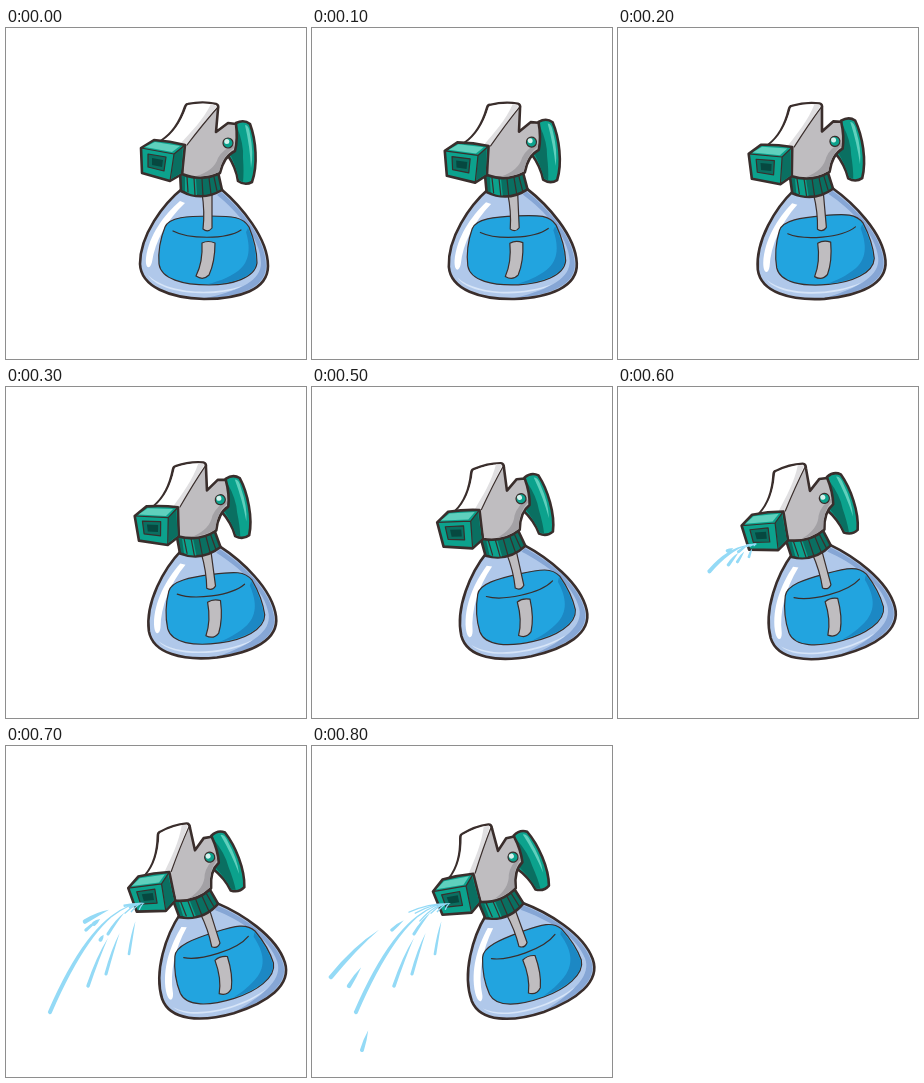
An HTML page that plays this animation: 300 px wide and 331 px high, repeating every 900 ms.

```html
<!DOCTYPE html>
<html lang="en">
<head>
<meta charset="utf-8">
<title>Spray bottle</title>
<style>
  html, body { margin: 0; width: 100%; height: 100%; overflow: hidden; background: #fff; }
  svg { display: block; width: 100vw; height: 100vh; }
  .line, .thin { stroke: #3a2e2c; stroke-linejoin: round; stroke-linecap: round; }
  .line { stroke-width: 2.6; }
  .thin { stroke-width: 1.2; }
  .none { fill: none; }
  .teal { fill: #0ca28d; }
  .dark { fill: #0a6f61; }
  .mint { fill: #5fd0bd; }
  .gray { fill: #bfbdc0; }
  .white { fill: #fff; }
  .shade { fill: #a3a1a5; }
</style>
</head>
<body>
<svg viewBox="0 0 300 331">
  <g id="bottle">
    <!-- glass -->
    <path fill="#b0c8ea" d="M177 160C157 176 134 207 134 236C135 259 164 270 198 271C233 271 262 262 262 238C262 210 235 178 215 161Z"/>
    <path fill="#86a6d5" d="M215 164C235 181 260 211 260 238C260 261 231 269 200 270C236 262 255 252 255 235C255 211 232 184 211 167Z"/>
    <path fill="#d7e5f8" d="M142 247C160 265 205 268 236 258C216 270 155 268 142 247Z"/>
    <path class="white" d="M174 173C158 187 143 207 140 230C139 241 144 242 146 234C149 213 161 192 179 175Z"/>

    <!-- water -->
    <path class="thin" fill="#22a4df" d="M159 199C163 189 182 188 204 188C227 188 237 189 243 199C248 211 251 225 251 235C249 250 226 257 203 257C177 257 155 251 153 236C152 223 155 209 159 199Z"/>
    <path fill="#1c88c4" d="M240 204C244 218 245 233 232 243C222 250 211 254 202 256C226 256 249 249 250 235C250 224 247 211 242 200Z"/>
    <path class="thin none" d="M167 203C182 211 220 212 235 202"/>

    <!-- tube -->
    <path class="thin gray" d="M196 165L206 165L206 200Q202 205 197 201Q199 184 196 165Z"/>
    <path class="thin gray" d="M196 215Q202 212 209 215Q209 234 203 247Q197 253 190 248Q197 234 196 215Z"/>
    <path class="line none" d="M177 160C157 176 134 207 134 236C135 259 164 270 198 271C233 271 262 262 262 238C262 210 235 178 215 161"/>

    <!-- trigger -->
    <path class="line teal" d="M230 95Q238 91 244 96C250 112 252 137 246 154Q239 158 232 153C231 145 227 135 221 126Z"/>
    <path class="dark" d="M231 99Q238 116 237 130Q238 144 237 154L233 152Q230 138 224 126Z"/>
    <path class="mint" d="M239 97Q243 97 244 106Q248 125 245 140Q244 119 239 97Z"/>

    <!-- collar -->
    <path class="line dark" d="M174 144L212 144L216 162Q196 174 175 163Z"/>
    <path class="teal" d="M179 149L190 151L191 167Q184 167 179 163Z"/>
    <path class="thin none" d="M181 149L182 164M188 150L189 167M196 151L197 168M203 150L205 166M208 149L211 163"/>

    <!-- head -->
    <path class="line gray" d="M182 76Q197 73 210 76Q213 77 212 81L210 104L222 95L230 96Q232 111 229 123Q218 128 214 145Q196 154 176 146L177 117L155 113Q171 103 179 79Q180 76 182 76Z"/>
    <path class="white" d="M182 77Q198 74 210 77L211 80C200 92 190 105 181 117L156 113Q172 103 181 78Z"/>
    <path fill="#e0dfe1" d="M205 76L211 78C200 92 190 105 181 117L174 116C186 103 197 92 205 76Z"/>
    <path class="thin none" d="M212 79Q197 96 181 117"/>
    <path class="shade" d="M228 120Q217 127 213 144Q202 149 190 148Q208 143 212 130Q217 121 228 117Z"/>
    <circle class="thin teal" cx="222" cy="115" r="5"/>
    <circle fill="#d5f1ec" cx="220.8" cy="113.5" r="2.5"/>

    <!-- nozzle -->
    <path class="line teal" d="M135 120L148 112Q164 113 179 117L176 146L164 153L136 145Z"/>
    <path class="mint" d="M139 119L149 114L174 118L166 124Z"/>
    <path class="dark" d="M168 126L177 118L175 145L165 151Z"/>
    <path class="thin none" d="M135 120L168 126L179 117M168 126L164 153"/>
    <path class="thin dark" d="M142 126L160 129L158 143L142 139Z"/>
    <path fill="#064840" d="M146 130L157 132L156 139L146 137Z"/>
  </g>
  <path id="spray" fill="#94daf6"/>
</svg>
<script>
const STEP = 100, STEPS = 9, TURN = 2.5;
const NOZZLE = { x: 139, y: 157 };
const bottle = document.getElementById('bottle');
const spray = document.getElementById('spray');

// Jets fly left along parabolas; tail is where the falling drop begins.
const jets = [
  { reach: 95, fall: 109, tail: 0.2, start: 5 },
  { reach: 57, fall: 83, tail: 0.65, start: 5 },
  { reach: 39, fall: 71, tail: 0.65, start: 5 },
  { reach: 16, fall: 51, tail: 0.6, start: 5 },
  { reach: 59, fall: 27, tail: 0.8, start: 5 },
  { reach: 37, fall: 31, tail: 0.55, start: 5 },
  { reach: 120, fall: 74, tail: 0.6, start: 6 },
  { reach: 102, fall: 83, tail: 0.88, start: 6 },
  { reach: 89, fall: 147, tail: 0.93, start: 6 }
];

// Tapered piece of a jet's parabola between a and b (0 = nozzle, 1 = end).
function streak({ reach, fall }, a, b, w) {
  const at = (u, rise) => [NOZZLE.x - reach * u, NOZZLE.y + fall * rise];
  const [x1, y1] = at(a, a * a), [x2, y2] = at(b, b * b);
  const [cx, cy] = at((a + b) / 2, a * b);
  const length = Math.hypot(x2 - x1, y2 - y1);
  const nx = (y1 - y2) / length * w, ny = (x2 - x1) / length * w;
  return `M${x1} ${y1}Q${cx + nx} ${cy + ny} ${x2 + nx} ${y2 + ny}` +
    `A${w} ${w} 0 0 0 ${x2 - nx} ${y2 - ny}Q${cx - nx} ${cy - ny} ${x1} ${y1}Z`;
}

function drawJet(jet, step) {
  const head = Math.min(1, (step - jet.start) / 2);
  if (head <= 0) return '';
  return streak(jet, 0, 0.35 * head, 0.7) +
    streak(jet, jet.tail * head, head, 1.2 + jet.reach * 0.009);
}

function draw(now) {
  const step = Math.floor(now / STEP) % STEPS;
  bottle.setAttribute('transform', `rotate(${-TURN * step} 200.5 172.5)`);
  spray.setAttribute('d', jets.map(jet => drawJet(jet, step)).join(''));
}

const start = performance.now();
function tick() {
  draw(performance.now() - start);
  requestAnimationFrame(tick);
}
tick();
</script>
</body>
</html>
```
